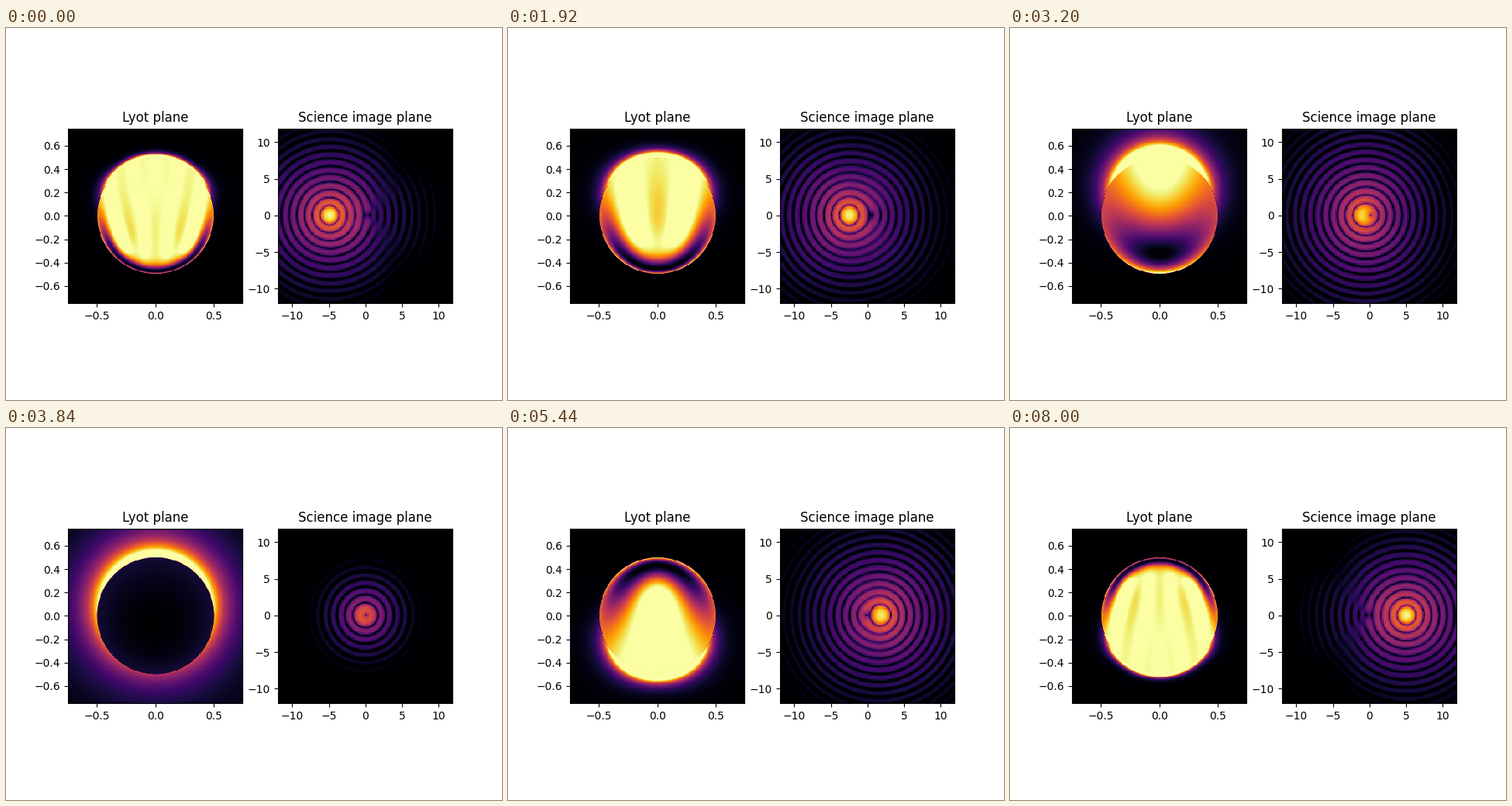
These frames come from a looping animation (640 px wide and 480 px high, 8.16 s). A matplotlib script:

```python
import numpy as np
import matplotlib.pyplot as plt
from matplotlib.animation import FuncAnimation
from matplotlib.colors import Normalize
from matplotlib.image import NonUniformImage

FRAMES, INTERVAL = 51, 160
N, WIDTH = 256, 1.5          # pupil samples and pupil plane size
CHARGE, LEVELS = 2, 5        # vortex charge, resolution levels in focus
HALF_WINDOW = 16             # half size of the refined core, in samples
OVERSAMPLE = 4

dx = WIDTH / N
du = 1 / (2 * WIDTH)
tilts = np.linspace(-5, 5, FRAMES)


def centred_grid(n):
    return (np.arange(n) - (n - 1) / 2) * WIDTH / n


def disk(diameter):
    """Circular aperture with grey edge pixels."""
    s = centred_grid(N * OVERSAMPLE)
    inside = np.hypot(*np.meshgrid(s, s)) <= diameter / 2
    return inside.reshape(N, OVERSAMPLE, N, OVERSAMPLE).mean(axis=(1, 3))


x = centred_grid(N)
aperture = disk(1)
lyot_stop = disk(0.95)


def vortex(u):
    uu, vv = np.meshgrid(u, u)
    phase = np.exp(1j * CHARGE * np.arctan2(vv, uu))
    return np.where(np.hypot(uu, vv) < 1e-9, 0, phase)


def window(u, level):
    """Smooth core handed over to the next finer level."""
    if level == LEVELS - 1:
        return np.zeros((u.size, u.size))
    t = u / (HALF_WINDOW * du / 4**level)
    w = np.where(np.abs(t) < 1, np.cos(np.pi * t / 2)**2, 0)
    return np.outer(w, w)


def fourier_matrix(u):
    return np.exp(-2j * np.pi * np.outer(u, x))


u_coarse = np.fft.fftfreq(2 * N, dx)
coarse_mask = vortex(u_coarse) * (1 - window(u_coarse, 0))

fine = []
for level in range(1, LEVELS):
    step = du / 4**level
    u = (np.arange(8 * HALF_WINDOW) - 4 * HALF_WINDOW) * step
    mask = vortex(u) * (window(u, level - 1) - window(u, level))
    fine.append((fourier_matrix(u), mask * (dx * step)**2))


def coronagraph(tilt):
    """Field in the Lyot plane for a source at the given offset."""
    field = aperture * np.exp(2j * np.pi * tilt * x)
    spectrum = np.fft.fft2(field, coarse_mask.shape)
    out = np.fft.ifft2(spectrum * coarse_mask)[:N, :N]
    for m, mask in fine:
        out = out + m.conj().T @ (mask * (m @ field @ m.T)) @ m.conj()
    return out


# Opposite tilts give the same field rotated by half a turn.
lyot_fields = [coronagraph(t) for t in tilts[:FRAMES // 2 + 1]]

u_image = (np.arange(192) - 96) / 8
to_image = fourier_matrix(u_image)
peak = aperture.sum()**2


def planes(i):
    mirror = FRAMES - 1 - i
    field = lyot_fields[i] if i <= mirror else lyot_fields[mirror][::-1, ::-1]
    image = np.abs(to_image @ (field * lyot_stop) @ to_image.T)**2
    return np.abs(field)**2, np.log10(image / peak + 1e-20)


def add_plane(position, title, coords, vmin, vmax):
    ax = fig.add_subplot(1, 2, position)
    lo, hi = coords[0], coords[-1]
    im = NonUniformImage(ax, extent=(lo, hi, lo, hi), interpolation="nearest",
                         cmap="inferno", norm=Normalize(vmin, vmax))
    im.set_data(coords, coords, np.full((coords.size, coords.size), float(vmin)))
    ax.add_image(im)
    im.set_clip_path(ax.patch)
    ax.set(xlim=(lo, hi), ylim=(lo, hi), aspect="equal", title=title)
    return im


fig = plt.figure(figsize=(6.4, 4.8), dpi=100)
lyot = add_plane(1, "Lyot plane", x, 0, 1)
science = add_plane(2, "Science image plane", u_image, -5, 0)


def update(i):
    intensity, image = planes(i)
    lyot.set_data(x, x, intensity)
    science.set_data(u_image, u_image, image)
    return lyot, science


anim = FuncAnimation(fig, update, frames=FRAMES, interval=INTERVAL,
                     repeat=True, repeat_delay=0, blit=False)
plt.show()
```
